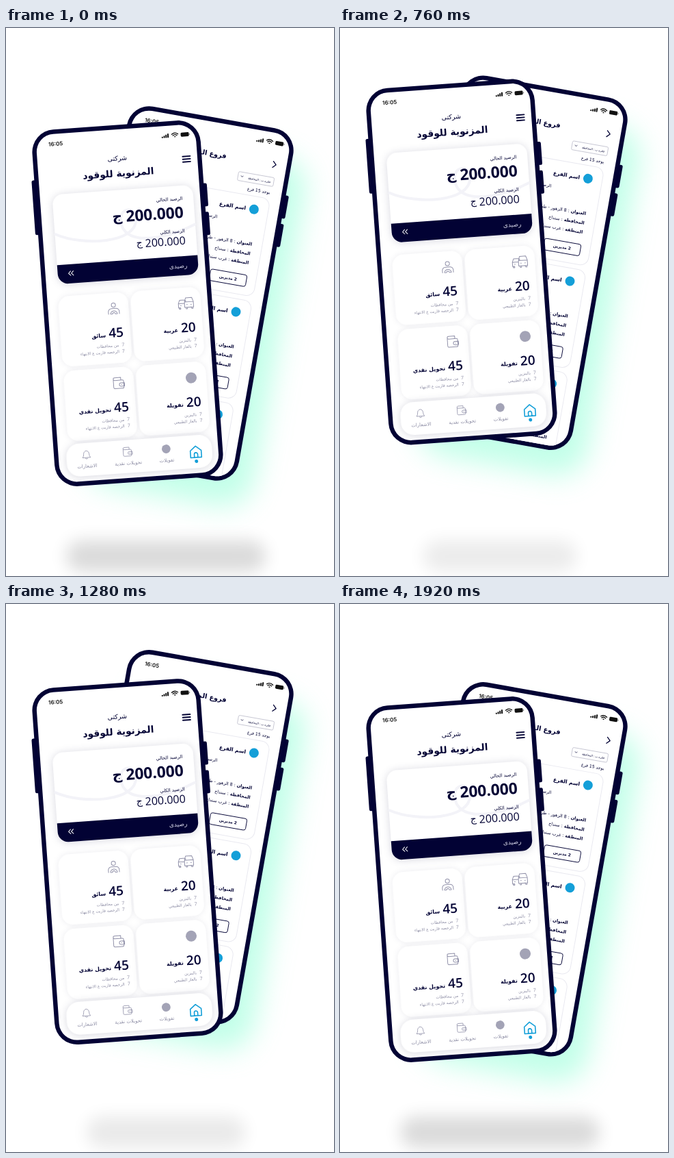
Recreate the animation shown at these times as an HTML page. Size 480 by 800 pixels, loop 1.96 s.

```html
<!DOCTYPE html>
<html lang="ar">
<head>
<meta charset="utf-8">
<style>
  html, body { margin: 0; width: 100%; height: 100%; overflow: hidden; background: #fff; }
  svg { display: block; width: 480px; height: 800px; }
  text { font-family: 'DejaVu Sans', sans-serif; fill: #020234; }
  .num { font-family: 'Open Sans', sans-serif; }
  .time { font: 600 8px Inter, sans-serif; fill: #111; }
  .line { fill: none; stroke: #9292aa; stroke-width: 1; stroke-linecap: round; stroke-linejoin: round; }
  .soft { fill: #fff; filter: drop-shadow(0 0 4px #02023414); }
  .raised { fill: #fff; filter: drop-shadow(0 1px 6px #02023428); }
</style>
</head>
<body>
<svg viewBox="0 0 480 800">
  <defs><clipPath id="screen"><rect x="-117" y="-254.5" width="234" height="509" rx="26"/></clipPath></defs>
  <rect id="floor" y="748" height="46" rx="23" style="filter:blur(12px)"/>
  <g id="back"></g>
  <g id="front"></g>
</svg>
<script>
const NAVY = '#020234', GREY = '#8c8ca4', BLUE = '#149fd8', LOOP = 1960;
const $ = id => document.getElementById(id);

const rect = (x, y, w, h, r, attrs = '') =>
  `<rect x="${x}" y="${y}" width="${w}" height="${h}" rx="${r}" ${attrs}/>`;
const circle = (x, y, r, color) => `<circle cx="${x}" cy="${y}" r="${r}" fill="${color}"/>`;
const path = (d, attrs = 'class="line"') => `<path d="${d}" ${attrs}/>`;
const stroke = (color, width) =>
  `fill="none" stroke="${color}" stroke-width="${width}" stroke-linecap="round" stroke-linejoin="round"`;
const move = (x, y, body) => `<g transform="translate(${x} ${y})">${body}</g>`;

// Arabic text: x is the right end, or the centre when mid is set.
const ar = (x, y, s, size, { bold, mid, color = NAVY } = {}) =>
  `<text x="${x}" y="${y}" direction="rtl" font-size="${size}" font-weight="${bold ? 700 : 400}"
    text-anchor="${mid ? 'middle' : 'start'}" style="fill:${color}">${s}</text>`;
const num = (x, y, s, size, weight = 400, color = NAVY) =>
  `<text class="num" x="${x}" y="${y}" font-size="${size}" font-weight="${weight}"
    text-anchor="end" style="fill:${color}">${s}</text>`;

const icons = {
  cars: path(`M-11 6v-6l2-5h8l1 2M-11 0h9M-11 6h3v2h-2v-2M-8 3h1M-2 3v-5l2-6h9l2 6v8h-13z
    M-2 -2h13M0 6v2h2v-2M8 6v2h2v-2M1 2h1M7 2h1`),
  driver: path(`M-3 -5a3 3 0 1 0 6 0a3 3 0 1 0 -6 0M-8 8v-4q1-4 5-4h6q4 0 5 4v4
    M-5 8a5 4.5 0 0 1 10 0M-2 8a2 2 0 0 1 4 0M-5 8h3M2 8h3`),
  wallet: path(`M-8 -5v11q0 2 2 2h11q2 0 2-2v-8q0-2-2-2h-11q-2 0-2-2t2-2h9v4
    M8 0h-5a2.5 2.5 0 0 0 0 5h5zM3.5 2.5h.5`),
  bell: path('M-7 5q2-2 2-6a5 6 0 0 1 10 0q0 4 2 6zM-2 7q2 2 4 0'),
  dot: circle(0, 0, 8, '#a3a3b6')
};

const status = () => `<text class="time" x="-99" y="-237">16:05</text>`
  + [2, 3.2, 4.6, 6].map((h, i) => rect(67 + i * 2.8, -237 - h, 2, h, .5, 'fill="#111"')).join('')
  + path('M82 -241.5q4.5-3.6 9 0M83.6 -239.6q2.9-2.4 5.8 0M86 -237.8h1', stroke('#111', 1.4))
  + rect(95, -243, 12, 6, 1.6, 'fill="#111"') + rect(107.6, -241.2, 1, 2.4, .5, 'fill="#777"');

const phone = body => [[-127.5, -189, 80], [118, -167, 34], [118, -125, 34]]
    .map(([x, y, h]) => rect(x, y, 10, h, 2.5, `fill="${NAVY}"`)).join('')
  + rect(-123.5, -261, 247, 522, 33, `fill="${NAVY}"`)
  + `<g clip-path="url(#screen)">${rect(-118, -256, 236, 512, 0, 'fill="#fff"')}${status()}${body}</g>`;

const field = (y, label, value) =>
  ar(87, y, `<tspan font-weight="700">${label}</tspan> : ${value}`, 6.4);

const branch = rect(-102, -158, 204, 145, 12, 'fill="#fff" stroke="#e9e9f0"')
  + circle(81, -139, 7, BLUE)
  + ar(69, -136, 'اسم الفرع', 7.6, { bold: true })
  + ar(30, -117, 'الرصيد', 6.2)
  + field(-86, 'العنوان', '8 الزهور - طريق')
  + field(-72, 'المحافظة', 'سنداح')
  + field(-58.5, 'المنطقة', 'غرب سنداح')
  + rect(34, -42.5, 54, 17, 3, `fill="#fff" stroke="${NAVY}" stroke-width=".9"`)
  + ar(61, -32, '2 مديرين', 5.8, { bold: true, mid: true });

const backScreen = path('M97 -213l4.5 4.5l-4.5 4.5', stroke(NAVY, 1.3))
  + ar(28, -205, 'فروع المنشأة', 9.8, { bold: true })
  + rect(49.5, -189.5, 53, 13, 2, 'fill="#fff" stroke="#b4b4c4" stroke-width=".7"')
  + ar(98, -181, 'فلتره ب : المحافظة', 4)
  + path('M54 -184l1.5 1.5l1.5-1.5', stroke(NAVY, .6))
  + ar(100, -165, 'يوجد 15 فرع', 6.2)
  + [0, 152, 304].map(y => move(0, y, branch)).join('');

// One statistics tile; x is the right end of its text.
const tile = (x, y, icon, count, label, a, b) => {
  const notes = [a, b].map((s, i) => ar(x - 8, 62 + i * 9.2, s, 5.8, { color: GREY })
    + num(x, 62 + i * 9.2, '7', 7, 400, GREY)).join('');
  return move(0, y, rect(x < 0 ? -101.5 : 4.5, -17, 102.5, 103, 16, 'class="soft"')
    + move(x - 12, 6, icons[icon]) + num(x, 48, count, 19, 600)
    + ar(x - 26, 47, label, 8, { bold: true }) + notes);
};
const tab = (x, icon, label) =>
  move(x, 216, `<g transform="scale(.8)">${icons[icon]}</g>`)
  + ar(x, 235, label, 7, { mid: true, color: GREY });

const drivers = ['من محافظات', 'الرخصه قاربت ع الانتهاء'];
const fuels = ['بالبنزين', 'بالغاز الطبيعي'];

const frontScreen = path('M95.5 -208h11M95.5 -204h11M95.5 -200h11', stroke(NAVY, 1.9))
  + ar(0, -209, 'شركتى', 9.5, { mid: true })
  + ar(0, -185.5, 'المزنوية للوقود', 13.8, { bold: true, mid: true })
  + rect(-99, -166, 206, 131, 15, 'class="raised"')
  + path('M-98 -108C-60 -88 20 -86 21 -122C20 -144 -8 -140 0 -112C10 -86 60 -88 106 -108', stroke('#f3f3f8', 4))
  + ar(91, -145, 'الرصيد الحالي', 6.7)
  + num(91, -119, '200.000', 22.8, 700)
  + ar(1, -121, 'ج', 20, { bold: true })
  + ar(91, -97.5, 'الرصيد الكلي', 6.7)
  + num(91, -80, '200.000', 16)
  + ar(28, -82, 'ج', 14)
  + path('M-99 -63H107V-50a15 15 0 0 1 -15 15H-84a15 15 0 0 1 -15 -15z', `fill="${NAVY}"`)
  + ar(91, -46, 'رصيدى', 9, { color: '#d4d4e6' })
  + path('M-80 -53l-3 3.2l3 3.2M-76 -53l-3 3.2l3 3.2', stroke('#fff', 1))
  + tile(-9, 0, 'driver', 45, 'سائق', ...drivers)
  + tile(97, 0, 'cars', 20, 'عربية', ...fuels)
  + tile(-9, 109, 'wallet', 45, 'تحويل نقدي', ...drivers)
  + tile(97, 109, 'dot', 20, 'تفويلة', ...fuels)
  + rect(-105.5, 199, 213.5, 48, 19, 'class="raised"')
  + tab(-76, 'bell', 'الاشعارات')
  + tab(-15.5, 'wallet', 'تحويلات نقدية')
  + tab(41, 'dot', 'تفويلات')
  + path('M76 221.5l8-6.5l8 6.5v10h-16zM81.5 231v-4a2.5 2.5 0 0 1 5 0v4', stroke(BLUE, 1.6))
  + circle(84, 237, 2.5, BLUE);

$('back').innerHTML = rect(-102, -222, 252, 518, 45, 'fill="#a8ffdf" opacity=".7" style="filter:blur(20px)"')
  + phone(backScreen);
$('front').innerHTML = phone(frontScreen);

// Eased rise from 0 to 1, then an eased fall back to 0.
const swell = (t, rise, fall) => {
  const d = t < rise ? 1 - t / rise : (t - rise) / fall;
  return (1 + Math.cos(Math.PI * Math.min(d, 1))) / 2;
};
const lift = t => swell(t, 765, 945);

const start = performance.now();
function draw() {
  const t = (performance.now() - start) % LOOP;
  $('front').setAttribute('transform', `translate(178 ${402 - 60.5 * lift(t)}) rotate(-4.1)`);
  $('back').setAttribute('transform', `translate(259 ${387.5 - 58.5 * lift(t - 242)}) rotate(10)`);
  const k = swell(t, LOOP / 2, LOOP / 2), w = 146 - 38 * k;
  $('floor').setAttribute('x', 234 - w);
  $('floor').setAttribute('width', 2 * w);
  $('floor').setAttribute('opacity', .14 - .075 * k);
  requestAnimationFrame(draw);
}
draw();
</script>
</body>
</html>
```
